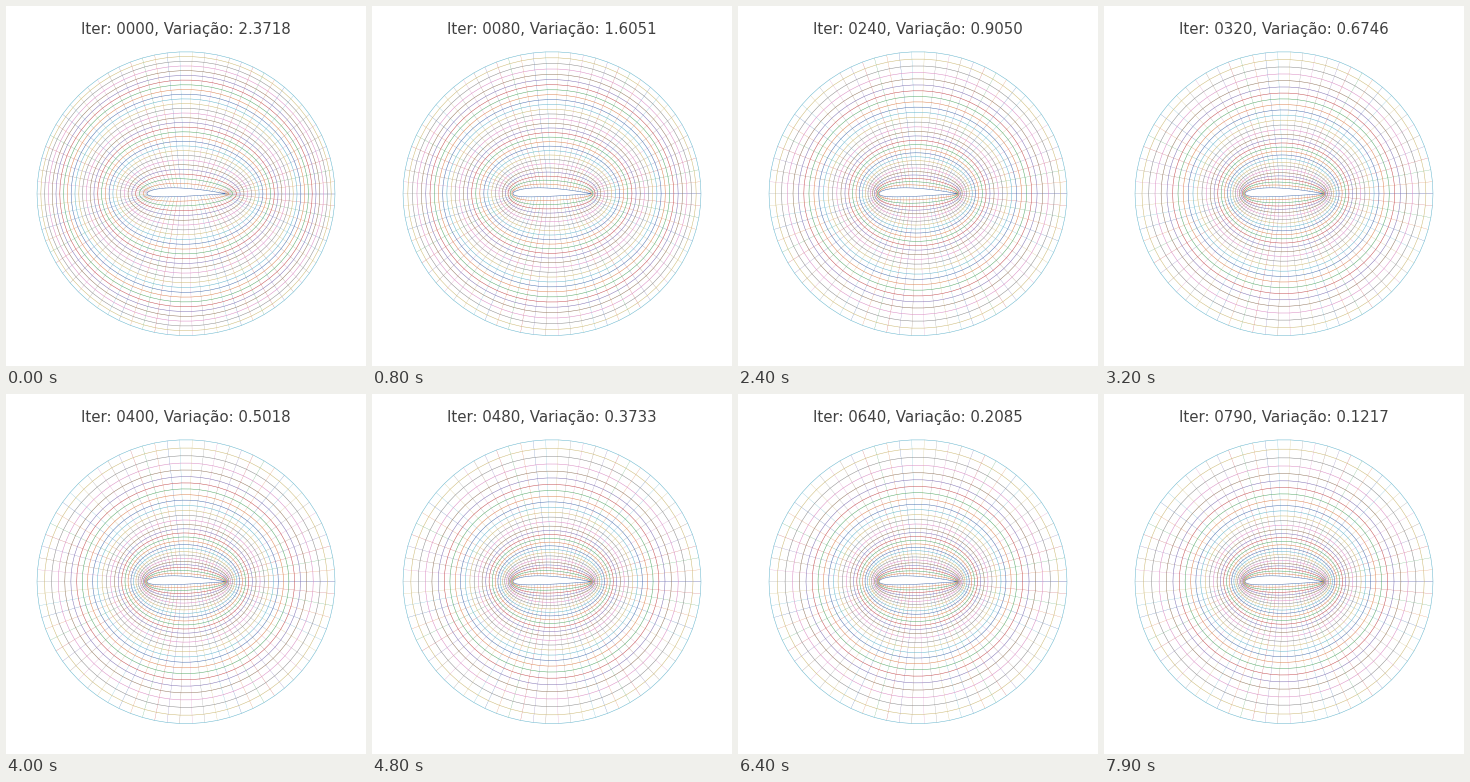
A matplotlib script that plays this animation: 360x360 px, repeating every 8 s.

```python
import matplotlib.pyplot as plt
import numpy as np
from matplotlib.animation import FuncAnimation
from matplotlib.collections import LineCollection

SIZE, DPI = 360, 100
FRAMES, STEP = 80, 10
RINGS, SPOKES = 30, 74
PALETTE = ["#4C72B0", "#DD8452", "#55A868", "#C44E52", "#8172B3",
           "#937860", "#DA8BC3", "#8C8C8C", "#CCB974", "#64B5CD"]
CENTER = np.array([180.0, 187.7])
SCALE = np.array([78.0, -74.3])
RADIUS = 1.91

# Residual of the solver at a few iterations, log-interpolated between
ITERS = [0, 80, 160, 320, 480, 640, 790]
RESIDUALS = [2.3718, 1.6051, 1.2142, 0.6746, 0.3733, 0.2085, 0.1217]


def airfoil(theta, camber=0.02, peak=0.4, thick=0.12):
    """NACA 2412 with cosine spacing, chord centred on the origin."""
    x = 0.5 + 0.5 * np.cos(theta)
    half = 5 * thick * (0.2969 * np.sqrt(x) - 0.1260 * x - 0.3516 * x**2
                        + 0.2843 * x**3 - 0.1036 * x**4)
    front = x < peak
    scale = np.where(front, camber / peak**2, camber / (1 - peak)**2)
    mean = scale * np.where(front, 2 * peak * x - x**2,
                            1 - 2 * peak + 2 * peak * x - x**2)
    slope = np.arctan(2 * scale * (peak - x))
    side = np.sign(np.sin(theta))
    side[np.abs(np.sin(theta)) < 1e-9] = 0
    return np.stack([x - side * half * np.sin(slope) - 0.5,
                     mean + side * half * np.cos(slope)], -1)


def relax(grid):
    """One Jacobi sweep of the elliptic grid equations."""
    east, west = np.roll(grid, -1, 1), np.roll(grid, 1, 1)
    d_xi = (east - west)[1:-1] / 2
    d_eta = (grid[2:] - grid[:-2]) / 2
    cross = (east[2:] - west[2:] - east[:-2] + west[:-2]) / 4
    a = (d_eta**2).sum(-1, keepdims=True)
    b = (d_xi * d_eta).sum(-1, keepdims=True)
    c = (d_xi**2).sum(-1, keepdims=True)
    new = grid.copy()
    new[1:-1] = (a * (east + west)[1:-1] + c * (grid[2:] + grid[:-2])
                 - 2 * b * cross) / (2 * (a + c))
    return new


def solve():
    theta = 2 * np.pi * np.arange(SPOKES) / SPOKES
    inner = airfoil(theta)
    outer = RADIUS * np.stack([np.cos(theta), np.sin(theta)], -1)
    t = np.linspace(0, 1, RINGS)[:, None, None]
    grid = (1 - t) * inner + t * outer
    states = []
    for i in range(FRAMES * STEP):
        if i % STEP == 0:
            closed = np.concatenate([grid, grid[:, :1]], 1)
            states.append(CENTER + SCALE * closed)
        grid = relax(grid)
    return states


def cycle(n):
    return [PALETTE[i % len(PALETTE)] for i in range(n)]


states = solve()
fig = plt.figure(figsize=(SIZE / DPI, SIZE / DPI), dpi=DPI, facecolor="white")
ax = fig.add_axes([0, 0, 1, 1])
ax.set(xlim=(0, SIZE), ylim=(SIZE, 0))
ax.axis("off")

rings = LineCollection([], colors=cycle(RINGS), linewidths=0.36)
spokes = LineCollection([], colors=cycle(SPOKES + 1), linewidths=0.16)
ax.add_collection(spokes)
ax.add_collection(rings)
title = ax.text(180, 28, "", ha="center", va="baseline", color="#404040",
                family="DejaVu Sans", size=10.8)


def draw(frame):
    n = frame * STEP
    grid = states[frame]
    rings.set_segments(list(grid))
    spokes.set_segments(list(grid.transpose(1, 0, 2)))
    residual = np.exp(np.interp(n, ITERS, np.log(RESIDUALS)))
    title.set_text(f"Iter: {n:04d}, Variação: {residual:.4f}")
    return rings, spokes, title


anim = FuncAnimation(fig, draw, frames=FRAMES, interval=100, repeat=True,
                     repeat_delay=0, blit=False)
plt.show()
```
